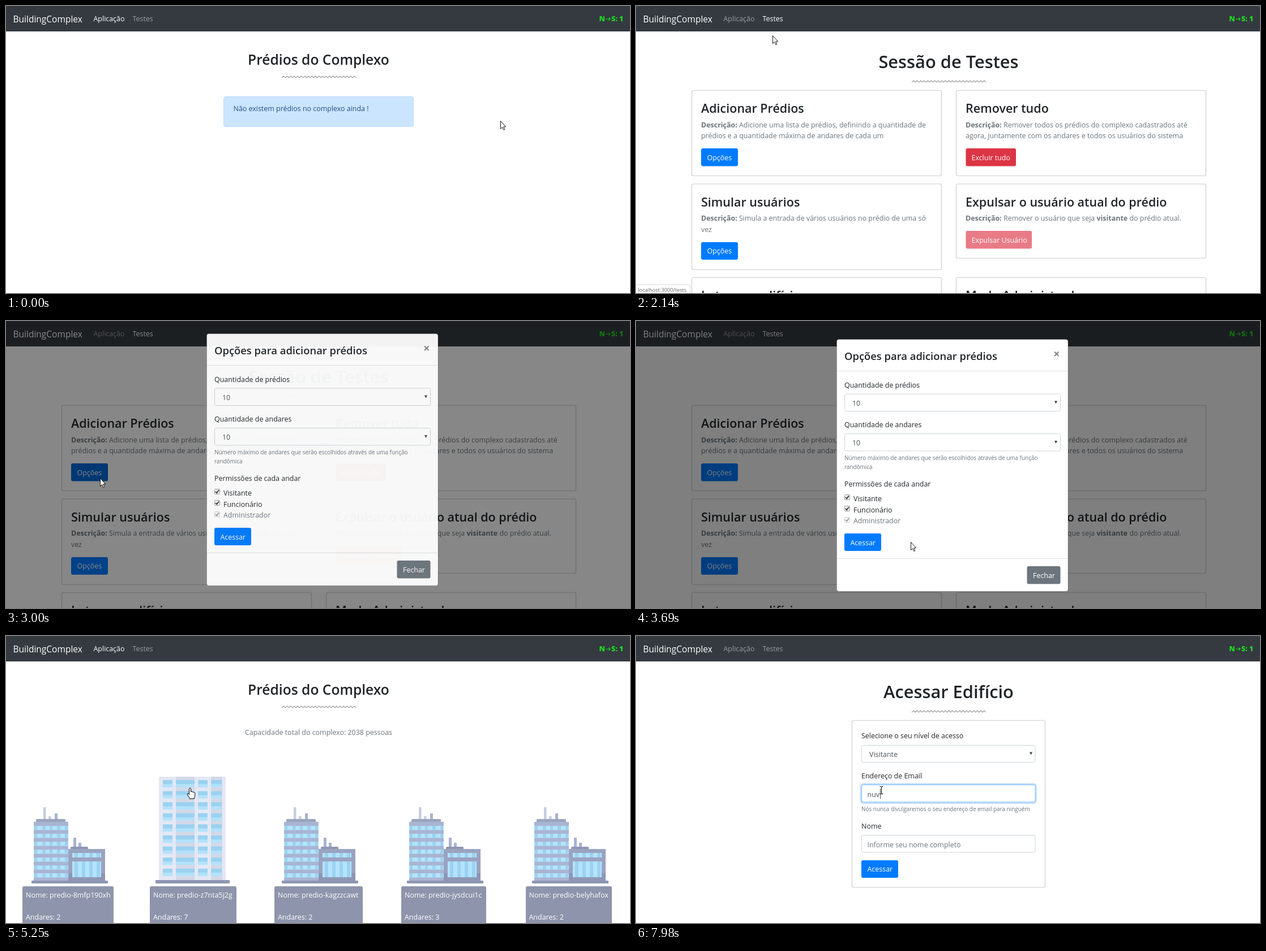
An HTML page that plays this animation: 1102x508 px, repeating every 8000 ms.

```html
<!DOCTYPE html>
<html lang="pt">
<head>
<meta charset="utf-8">
<title>BuildingComplex</title>
<style>
html, body { margin: 0; width: 100%; height: 100%; overflow: hidden; background: #fff; }
svg { display: block; width: 1102px; height: 508px; }
text { font: 12.45px "Open Sans", "Noto Sans", sans-serif; fill: #212529; }
.h1 { font-size: 30.8px; font-weight: 600; text-anchor: middle; }
.h2 { font-size: 24.6px; font-weight: 600; text-anchor: middle; }
.h3 { font-size: 21.5px; font-weight: 600; }
.h4 { font-size: 18.4px; font-weight: 600; }
.brand { font-size: 15.5px; }
.small { font-size: 9.95px; }
.status { font-size: 9.2px; fill: #666; }
.muted { fill: #6c757d; }
.field { fill: #495057; }
.white { fill: #fff; }
.mid { text-anchor: middle; }
.counter { font-weight: 800; fill: #1fdc1f; }
tspan { font-weight: 700; }
.typed tspan { font-weight: 400; }
.card { fill: #fff; stroke: #dadbdc; stroke-width: 1.7; }
.input { fill: #fff; stroke: #ced4da; }
.rule { stroke: #dee2e6; }
.blue { fill: #007bff; }
.red { fill: #dc3545; }
.gray { fill: #6c757d; }
.wave { fill: none; stroke: #6b6b6b; stroke-width: .9; }

/* One loop is 8 s, so 1% is 80 ms. */
.a { animation: 8s step-end infinite; }
#app { animation-name: app; }
#alert { animation-name: alert; }
#list { animation-name: list; }
#tests { animation-name: tests; }
#access { animation-name: access; }
#navApp { animation-name: navApp; }
#navTests { animation-name: navTests; }
#status { animation-name: status; }
#open { animation-name: open; }
#backdrop { animation-name: backdrop; }
#modal { animation-name: modal; }
#focus { animation-name: focus; }
#caret { animation-name: caret; }
#hint { animation-name: hint; }
#key1 { animation-name: key1; }
#key2 { animation-name: key2; }
#key3 { animation-name: key3; }
#pointer { animation-name: pointer; }
#arrow { animation-name: arrow; }
#hand { animation-name: hand; }
#beam { animation-name: beam; }

@keyframes app { 0%, 55.1% { visibility: visible } 22.1%, 71.375%, 100% { visibility: hidden } }
@keyframes tests { 0%, 55.1%, 100% { visibility: hidden } 22.1% { visibility: visible } }
@keyframes access { 0% { visibility: hidden } 71.375%, 100% { visibility: visible } }
@keyframes alert { 0% { opacity: 1 } 56.85%, 100% { opacity: 0 } }
@keyframes list { 0% { opacity: 0 } 56.85%, 100% { opacity: 1 } }
@keyframes navApp { 0%, 55.1% { fill: #fff } 22.1%, 71.375%, 100% { fill: #999c9f } }
@keyframes navTests { 0%, 55.1%, 100% { fill: #999c9f } 18.2% { fill: #ccced0 } 22.1% { fill: #fff } }
@keyframes status { 0%, 28.7%, 100% { opacity: 0 } 18.2% { opacity: 1 } }
@keyframes open { 0%, 40.5%, 100% { fill: #007bff } 32.5% { fill: #0069d9 } }
@keyframes backdrop {
  0%, 54.1%, 100% { opacity: 0 }
  36.45% { opacity: .22 }
  37.5% { opacity: .47 }
  38.5% { opacity: .5 }
  53.1% { opacity: .25 }
}
@keyframes modal {
  0%, 52.1%, 100% { opacity: 0; transform: translateY(-41px) }
  36.45% { opacity: .44; transform: translateY(-27px) }
  37.5% { opacity: .95; transform: translateY(-10px) }
  38.5% { opacity: 1; transform: translateY(-2px) }
  39.5% { opacity: 1; transform: none }
  51.1% { opacity: .5; transform: translateY(-14px) }
}
@keyframes focus { 0% { opacity: 0 } 85.2% { opacity: .4 } 86.1% { opacity: .8 } 87%, 100% { opacity: 1 } }
@keyframes caret {
  0% { opacity: 0; transform: none }
  85.2% { opacity: 1; transform: none }
  92% { opacity: 0; transform: none }
  97.7% { opacity: 1; transform: translateX(8px) }
  98.7% { opacity: 1; transform: translateX(15px) }
  99.7%, 100% { opacity: 1; transform: translateX(22px) }
}
@keyframes hint { 0% { opacity: 1 } 97.7%, 100% { opacity: 0 } }
@keyframes key1 { 0% { fill-opacity: 0 } 97.7%, 100% { fill-opacity: 1 } }
@keyframes key2 { 0% { fill-opacity: 0 } 98.7%, 100% { fill-opacity: 1 } }
@keyframes key3 { 0% { fill-opacity: 0 } 99.7%, 100% { fill-opacity: 1 } }
@keyframes pointer {
  0% { transform: translate(873px, 203px) }
  2.6% { transform: translate(873px, 203px); animation-timing-function: steps(2, start) }
  4.6% { transform: translate(837px, 183px) }
  7.5% { transform: translate(837px, 183px); animation-timing-function: steps(3, start) }
  10.3% { transform: translate(205px, 3px) }
  11.35% { transform: translate(205px, 3px); animation-timing-function: steps(5, start) }
  16.25% { transform: translate(300px, 24px); animation-timing-function: steps(4, start) }
  20.1% { transform: translate(238px, 26px) }
  26.7% { transform: translate(241px, 52px) }
  27.75% { transform: translate(241px, 52px); animation-timing-function: steps(6, start) }
  33.5% { transform: translate(166px, 278px) }
  38.5% { transform: translate(166px, 278px); animation-timing-function: steps(9, start) }
  47.06% { transform: translate(485px, 391px) }
  47.125% { transform: translate(485px, 391px); animation-timing-function: steps(3, start) }
  50% { transform: translate(414px, 393px) }
  60.75% { transform: translate(414px, 393px); animation-timing-function: steps(6, start) }
  66.58% { transform: translate(325px, 269px); animation-timing-function: steps(5, start) }
  71.4% { transform: translate(93px, 349px) }
  78.25% { transform: translate(92px, 349px); animation-timing-function: steps(6, start) }
  83.93% { transform: translate(429px, 272px) }
  84.25%, 100% { transform: translate(433px, 273px) }
}
@keyframes arrow { 0%, 67.5%, 71.375% { opacity: 1 } 61.7%, 69.4%, 82.95%, 100% { opacity: 0 } }
@keyframes hand { 0%, 67.5%, 71.375%, 100% { opacity: 0 } 61.7%, 69.4% { opacity: 1 } }
@keyframes beam { 0% { opacity: 0 } 82.95%, 100% { opacity: 1 } }
</style>
</head>
<body>
<svg viewBox="0 0 1102 508">
<defs>
  <pattern id="zig" width="6.25" height="6" patternUnits="userSpaceOnUse">
    <path class="wave" d="M-1 4.96L0 4L3.12 1L6.25 4L7.25 4.96"/>
  </pattern>
  <pattern id="floors" x="49" y="336" width="61" height="14" patternUnits="userSpaceOnUse">
    <path fill="#b5e3fc" d="M0 0h61v7.5h-61z"/>
    <path fill="#9bd2f1" d="M1 0h5v7.5h-5zM15 0h6v7.5h-6zM28 0h5v7.5h-5zM41 0h6v7.5h-6zM55 0h5v7.5h-5z"/>
  </pattern>
  <pattern id="glass" x="117" width="13" height="20" patternUnits="userSpaceOnUse">
    <path fill="#b5e3fc" d="M0 0h13v20h-13z"/>
    <path fill="#9bd2f1" d="M4 0h6v20h-6z"/>
  </pattern>
  <pattern id="panes" x="270" y="255" width="118" height="19.6" patternUnits="userSpaceOnUse">
    <path fill="#b3e2fb" d="M7 0h17v13h-17zM30 0h33v13h-33zM69 0h17v13h-17zM92 0h19v13h-19z"/>
    <path fill="#9bd1f0" d="M7 0h17v7h-17zM30 0h33v7h-33zM69 0h17v7h-17zM92 0h19v7h-19z"/>
  </pattern>
  <rect id="squiggle" width="131" height="6" fill="url(#zig)"/>
  <path id="drop" fill="#444" d="M-2.6-2.4h5.2L0 2.6z"/>
  <g id="check">
    <rect x=".5" y=".5" width="9" height="9" rx="1" fill="#f4f4f4" stroke="#999"/>
    <path d="M2 5l2.2 2.3L8 2.3" fill="none" stroke="#333" stroke-width="1.8"/>
  </g>
  <g id="office">
    <path fill="#c6cde1" d="M66 303h4.500v22h-4.500zM75 319h4.500v6h-4.500z"/>
    <path fill="#a9b3d0" d="M86 314h5v11h-5zM119 357h5v17h-5zM128 366h5v8h-5z"/>
    <rect x="53" y="324" width="52" height="6" rx="1.500" fill="#9aa3bf"/>
    <rect x="49" y="329" width="61" height="104" fill="#a9b4d1"/>
    <rect x="49" y="336" width="61" height="92" fill="url(#floors)"/>
    <rect x="114" y="373" width="31" height="6" rx="1.500" fill="#8e96b3"/>
    <rect x="110" y="377" width="65" height="56" fill="#9aa3c0"/>
    <path fill="#8e96b3" d="M110 420h65v13h-65z"/>
    <rect x="117" y="384" width="51" height="8" fill="url(#glass)"/>
    <rect x="117" y="399" width="51" height="28" fill="url(#glass)"/>
    <rect x="45" y="433" width="135" height="5" rx="1" fill="#8e96b3"/>
  </g>
  <g id="tower">
    <rect x="270" y="249" width="118" height="183" fill="#e4e8f4"/>
    <path fill="#d3d8e7" d="M300 249h33v183h-33zM362 249h20v183h-20z"/>
    <rect x="270" y="255" width="118" height="172" fill="url(#panes)"/>
    <rect x="264" y="432" width="131" height="6" rx="1" fill="#8e96b3"/>
  </g>
</defs>

<rect width="1102" height="508" fill="#fff"/>
<rect width="1102" height="45" fill="#343a40"/>
<text class="brand white" x="12.500" y="28.500">BuildingComplex</text>
<text id="navApp" class="a" x="154.500" y="27">Aplicação</text>
<text id="navTests" class="a" x="223.500" y="27">Testes</text>
<text class="counter" x="1047.500" y="27">N</text>
<path d="M1059 23h8m-2.500-2.500l2.500 2.500l-2.500 2.500" fill="none" stroke="#1fdc1f" stroke-width="1.200"/>
<text class="counter" x="1069" y="27">S: 1</text>

<g id="app" class="a">
  <text class="h2" x="552" y="104">Prédios do Complexo</text>
  <use href="#squiggle" x="487" y="123"/>
  <g id="alert" class="a">
    <rect x="384.500" y="160.500" width="335" height="53" rx="3" fill="#cce5ff" stroke="#b8daff"/>
    <text x="401.500" y="185.500" style="fill:#1f4f85">Não existem prédios no complexo ainda !</text>
  </g>
  <g id="list" class="a">
    <text class="muted mid" x="552" y="175">Capacidade total do complexo: 2038 pessoas</text>
    <use href="#office"/>
    <use href="#tower"/>
    <use href="#office" x="442"/>
    <use href="#office" x="663"/>
    <use href="#office" x="884"/>
    <g fill="#8e94ab">
      <rect x="29" y="443" width="161" height="80" rx="3"/>
      <rect x="254" y="443" width="153" height="80" rx="3"/>
      <rect x="474" y="443" width="156" height="80" rx="3"/>
      <rect x="698" y="443" width="150" height="80" rx="3"/>
      <rect x="918" y="443" width="152" height="80" rx="3"/>
    </g>
    <text class="white" x="35" y="463">Nome: predio-8mfp190xh</text>
    <text class="white" x="35" y="502">Andares: 2</text>
    <text class="white" x="260" y="463">Nome: predio-z7nta5j2g</text>
    <text class="white" x="260" y="502">Andares: 7</text>
    <text class="white" x="480" y="463">Nome: predio-kagzzcawt</text>
    <text class="white" x="480" y="502">Andares: 2</text>
    <text class="white" x="704" y="463">Nome: predio-jysdcui1c</text>
    <text class="white" x="704" y="502">Andares: 3</text>
    <text class="white" x="923.500" y="463">Nome: predio-belyhafox</text>
    <text class="white" x="923.500" y="502">Andares: 2</text>
  </g>
</g>

<g id="tests" class="a">
  <text class="h1" x="552" y="110">Sessão de Testes</text>
  <use href="#squiggle" x="487" y="131"/>
  <rect class="card" x="98.500" y="149.500" width="441" height="151" rx="3"/>
  <text class="h3" x="115" y="189">Adicionar Prédios</text>
  <text class="muted" x="115" y="214.500"><tspan>Descrição:</tspan> Adicione uma lista de prédios, definindo a quantidade de</text>
  <text class="muted" x="115" y="234">prédios e a quantidade máxima de andares de cada um</text>
  <rect id="open" class="a" x="115" y="252" width="65" height="31.500" rx="3"/>
  <text class="white" x="125.500" y="272.500">Opções</text>

  <rect class="card" x="565.500" y="149.500" width="441" height="151" rx="3"/>
  <text class="h3" x="582" y="189">Remover tudo</text>
  <text class="muted" x="582" y="214.500"><tspan>Descrição:</tspan> Remover todos os prédios do complexo cadastrados até</text>
  <text class="muted" x="582" y="234">agora, juntamente com os andares e todos os usuários do sistema</text>
  <rect class="red" x="582.500" y="252" width="88.500" height="31.500" rx="3"/>
  <text class="white" x="592.500" y="272.500">Excluir tudo</text>

  <rect class="card" x="98.500" y="315" width="441" height="151.500" rx="3"/>
  <text class="h3" x="115" y="354.500">Simular usuários</text>
  <text class="muted" x="115" y="380"><tspan>Descrição:</tspan> Simula a entrada de vários usuários no prédio de uma só</text>
  <text class="muted" x="115" y="400">vez</text>
  <rect class="blue" x="115" y="418" width="65" height="31" rx="3"/>
  <text class="white" x="125.500" y="438">Opções</text>

  <rect class="card" x="565.500" y="315" width="441" height="131.500" rx="3"/>
  <text class="h3" x="582" y="354.500">Expulsar o usuário atual do prédio</text>
  <text class="muted" x="582" y="380"><tspan>Descrição:</tspan> Remover o usuário que seja <tspan>visitante</tspan> do prédio atual.</text>
  <rect class="red" x="582.500" y="398" width="116.500" height="31.500" rx="3" opacity=".65"/>
  <text class="white" x="592.500" y="418.500">Expulsar Usuário</text>

  <rect class="card" x="98.500" y="480.500" width="441" height="60" rx="3"/>
  <text class="h3" x="115" y="520">Lotar um edifício</text>
  <rect class="card" x="565.500" y="480.500" width="441" height="60" rx="3"/>
  <text class="h3" x="582" y="520">Modo Administrador</text>
</g>

<g id="access" class="a">
  <text class="h1" x="552" y="110">Acessar Edifício</text>
  <use href="#squiggle" x="487" y="131"/>
  <rect class="card" x="381.500" y="149.500" width="341" height="295.500" rx="3"/>
  <text x="398" y="181">Selecione o seu nível de acesso</text>
  <rect class="input" x="398.500" y="193.500" width="306.500" height="30" rx="3"/>
  <text class="field" x="412" y="214">Visitante</text>
  <use href="#drop" x="697.500" y="208"/>
  <text x="398" y="251.500">Endereço de Email</text>
  <rect class="input" x="398.500" y="263.500" width="306.500" height="30.500" rx="3"/>
  <g id="focus" class="a">
    <rect x="397" y="262" width="309.500" height="33.500" rx="4.500" fill="none" stroke="#bfdeff" stroke-width="2.800"/>
    <rect x="398.500" y="263.500" width="306.500" height="30.500" rx="3" fill="#fff" stroke="#80bdff"/>
  </g>
  <text id="hint" class="a muted" x="408.500" y="284.500">Informe seu endereço de email</text>
  <text class="field typed" x="408.500" y="284.500"><tspan id="key1" class="a">n</tspan><tspan id="key2" class="a">u</tspan><tspan id="key3" class="a">v</tspan></text>
  <rect id="caret" class="a" x="409" y="270" width="1" height="18" fill="#495057"/>
  <text class="small muted" x="398" y="310">Nós nunca divulgaremos o seu endereço de email para ninguém</text>
  <text x="398" y="341">Nome</text>
  <rect class="input" x="398.500" y="352.500" width="306.500" height="30.500" rx="3"/>
  <text class="muted" x="408.500" y="374">Informe seu nome completo</text>
  <rect class="blue" x="398" y="397" width="65" height="31" rx="3"/>
  <text class="white" x="408.500" y="417">Acessar</text>
</g>

<g id="status" class="a">
  <path d="M0 493.500h92q3.500 0 3.500 3.500v12H0" fill="#fff" stroke="#dcdcdc"/>
  <text class="status" x="3.500" y="506">localhost:3000/tests</text>
</g>

<rect id="backdrop" class="a" width="1102" height="508"/>
<g id="modal" class="a">
  <rect x="354.500" y="32.500" width="408.500" height="446" rx="4" fill="#fff" stroke="#000" stroke-opacity=".2"/>
  <text class="h4" x="368" y="69">Opções para adicionar prédios</text>
  <path d="M739 54.500l7.500 7.500m0-7.500l-7.500 7.500" stroke="#7f7f7f" stroke-width="2"/>
  <path class="rule" d="M355 88.500h408M355 420.500h408"/>
  <text x="368" y="117.500">Quantidade de prédios</text>
  <rect class="input" x="368.500" y="129" width="381" height="30.500" rx="3"/>
  <text class="field" x="382" y="149.500">10</text>
  <use href="#drop" x="741.500" y="144"/>
  <text x="368" y="188">Quantidade de andares</text>
  <rect class="input" x="368.500" y="199.500" width="381" height="30.500" rx="3"/>
  <text class="field" x="382" y="220">10</text>
  <use href="#drop" x="741.500" y="214.500"/>
  <text class="small muted" x="368" y="246">Número máximo de andares que serão escolhidos através de uma função</text>
  <text class="small muted" x="368" y="261.500">randômica</text>
  <text x="368" y="293">Permissões de cada andar</text>
  <use href="#check" x="368" y="307"/>
  <text x="384" y="319">Visitante</text>
  <use href="#check" x="368" y="327"/>
  <text x="384" y="338.500">Funcionário</text>
  <use href="#check" x="368" y="347" opacity=".5"/>
  <text class="muted" x="384" y="358">Administrador</text>
  <rect class="blue" x="368" y="376" width="65" height="31" rx="3"/>
  <text class="white" x="378.500" y="396.500">Acessar</text>
  <rect class="gray" x="690.500" y="434" width="59" height="31.500" rx="3"/>
  <text class="white" x="701" y="455">Fechar</text>
</g>

<g id="pointer" class="a" stroke="#000">
  <path id="arrow" class="a" fill="#fff" stroke-width=".9" d="M.5.5V14.500L3.600 11.600L5.800 16.500L7.900 15.500L5.700 10.800H9.700Z"/>
  <path id="hand" class="a" fill="#fff" stroke-width="1" stroke-linejoin="round" d="M-1.500 1.200Q0-1.200 1.500 1.200V6.500Q3.400 5.400 4.200 7.200Q5.800 6.300 6.700 8Q8.800 7.400 8.800 9.600V13.500Q8.500 15.500 7.300 17V19H-.8V17.500Q-3 14.800-4.600 11.600Q-5 9.300-3 9.800L-1.500 11.500Z"/>
  <path id="beam" class="a" fill="none" d="M-2.500-6.500H0M1-6.500H3.500M.5-6.500V6.500M-2.500 6.500H0M1 6.500H3.500"/>
</g>
</svg>
</body>
</html>
```
